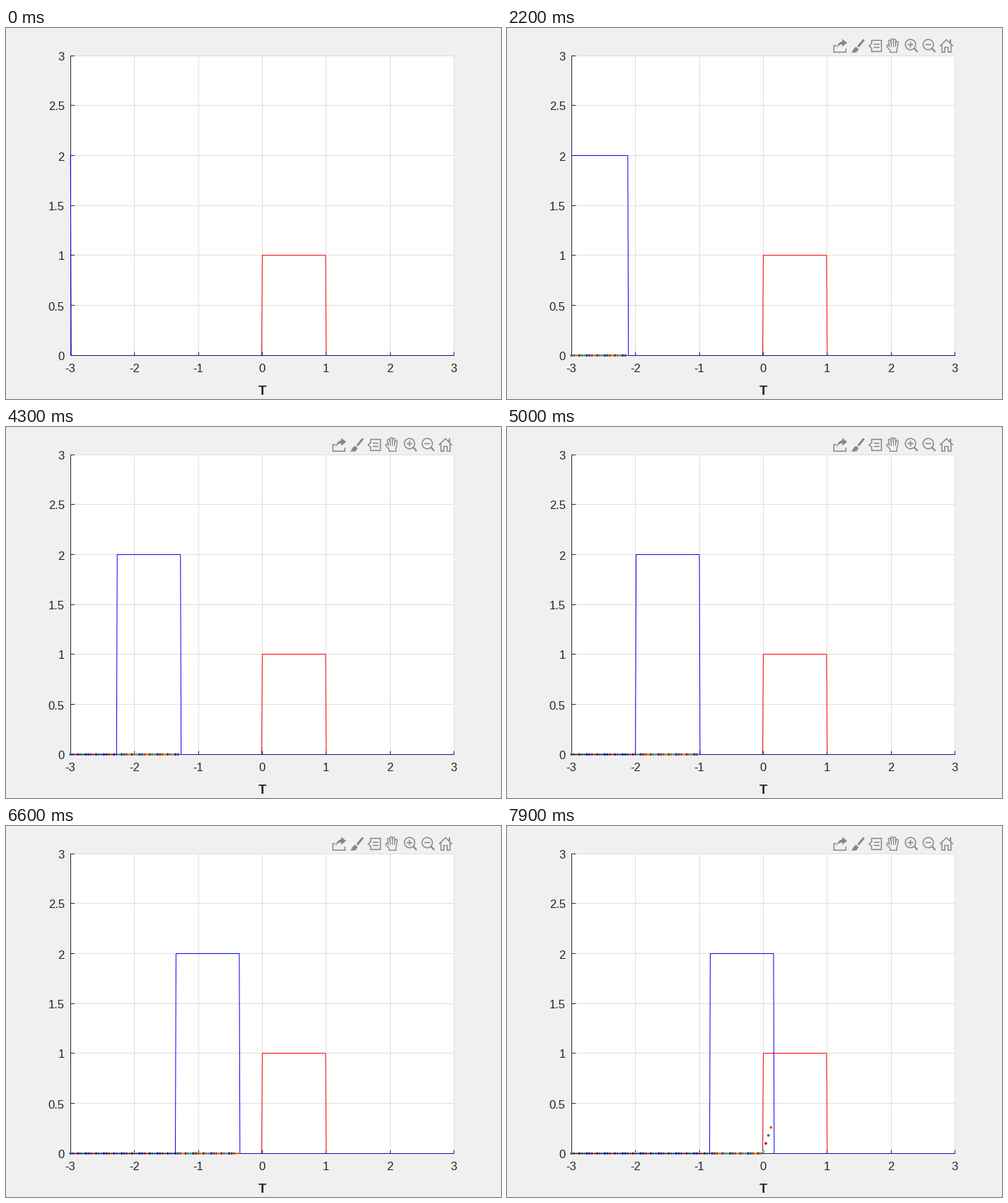
A matplotlib script for the animation above (8000 ms loop, 700 px wide and 525 px high).

```python
import numpy as np
import matplotlib.pyplot as plt
from matplotlib.animation import FuncAnimation
from matplotlib.patches import Circle, Polygon, Rectangle

W, H, DPI = 700, 525, 100
FRAMES, INTERVAL = 80, 100
PX = 72 / DPI
BACK, INK, ICON, GRID = "#F0F0F0", "#262626", "#868686", "#DFDFDF"
ORDER = ["#0072BD", "#D95319", "#EDB120", "#7E2F8E",
         "#77AC30", "#4DBEEE", "#A2142F"]

plt.rcParams["path.simplify"] = False
plt.rcParams["font.family"] = "Liberation Sans"

fig = plt.figure(figsize=(W / DPI, H / DPI), dpi=DPI, facecolor=BACK)
ax = fig.add_axes([0, 0, 1, 1])
ax.set_xlim(0, W)
ax.set_ylim(H, 0)
ax.axis("off")


def sx(v):
    return 91.25 + 90.4 * (np.asarray(v) + 3)


def sy(v):
    return 463.3 - 141.35 * np.asarray(v)


def pixel(p):
    """Centre of the pixel that holds p, for crisp lines."""
    return np.floor(p) + 0.5


def line(xs, ys, color, width=1, z=1, cap="butt", alpha=1):
    return ax.plot(xs, ys, color=color, lw=width * PX, zorder=z, snap=False,
                   solid_capstyle=cap, solid_joinstyle="miter",
                   alpha=alpha)[0]


def text(x, y, s, size=16.67, **kw):
    ax.text(x, y, s, fontsize=size * PX, color=INK, va="baseline", **kw)


# Axes box, grid, ticks and labels
left, right, top, base = pixel(sx(-3)), 634, 39, pixel(sy(0))
ax.add_patch(Rectangle((91, top), 543, 425, fc="white", lw=0, zorder=0))
for v in range(-3, 4):
    x = pixel(sx(v))
    line([x, x], [top, base], GRID)
    line([x, x], [base - 5, base], INK, z=1.5)
    text(sx(v) - 0.3, 487, str(v), ha="center")
for v in np.arange(0, 3.5, 0.5):
    y = pixel(sy(v))
    line([left, right], [y, y], GRID)
    line([left, left + 5.5], [y, y], INK, z=1.5)
    text(82.8, y + 7, f"{v:g}", ha="right")
line([left, left], [top, base], INK, z=1.6)
line([left, right], [base, base], INK, z=1.6)
line([left, right], [base, base], INK, z=4.5, alpha=0.4)
text(362.5, 519, "T", 18.33, ha="center", weight="bold")

# Pulses sampled every 0.01; n counts hundredths
n = np.arange(-300, 301)
red = ((n >= 0) & (n < 100)).astype(float)
line(sx(n / 100), pixel(sy(red)), "#FF0000", z=2)
blue = line([], [], "#0000FF", z=4)


def pulse(t):
    return 2.0 * ((n > t - 100) & (n <= t))


# Running product sum, one dot per step
steps = -300 + 4 * np.arange(FRAMES)
area = np.array([np.sum(red * pulse(t)) * 0.01 for t in steps])
points = np.column_stack([sx(steps / 100), sy(area)])
colors = [ORDER[i % len(ORDER)] for i in range(FRAMES)]
dots = ax.scatter([], [], s=(3.7 * PX) ** 2, linewidths=0, zorder=3,
                  clip_on=False)

# Toolbar icons, drawn around their centre (cx, CY)
CY = 25
tools = []


def stroke(cx, xs, ys, width=1.5, color=ICON, cap="butt"):
    tools.append(line(cx + np.array(xs), CY + np.array(ys), color, width,
                      5 + len(tools) / 100, cap))


def solid(cx, xs, ys):
    pts = np.column_stack([cx + np.array(xs), CY + np.array(ys)])
    tools.append(ax.add_patch(Polygon(pts, fc=ICON, lw=0, zorder=5)))


def export_icon(cx):
    stroke(cx, [-5, -8.7, -8.7, 8.3, 8.3], [0, 0, 9.2, 9.2, 4])
    solid(cx, [3, 10, 3], [-9.5, -4, 1.5])
    a = np.linspace(0, np.pi / 2, 12)
    xs, ys = -5 + 8.5 * (1 - np.cos(a)), -np.sin(a)
    solid(cx, [*xs, *xs[::-1]], [*(6 + 12 * ys), *(6 + 8 * ys[::-1])])


def brush_icon(cx):
    stroke(cx, [8.7, 0.5], [-8.5, 1.5], 3)
    solid(cx, [-9, -5.5, -2.5, 1.2, -2], [9.8, 4, 1.5, 5, 9.5])


def tip_icon(cx):
    stroke(cx, [-5.5, -5.5, 8.3, 8.3, -5.5, -5.5, -9, -5.5, -5.5],
           [-4, -7.5, -7.5, 8.3, 8.3, 3.5, 0.3, -3, -4])
    for y in (-2, 2.5):
        stroke(cx, [-2.5, 5.5], [y, y])


def hand_icon(cx):
    # A wide pass in grey, then a narrow one in the back colour
    for color, trim in ((ICON, 0), (BACK, 2.7)):
        for i in range(4):
            stroke(cx, [3.6 * i - 5.3, 2.4 * i - 3.2],
                   [1.3 * (i - 1.3) ** 2 - 8.4, 4], 4.5 - trim, color, "round")
        stroke(cx, [-7.8, -2], [0.5, 7], 4.5 - trim, color, "round")
        stroke(cx, [0.3, 0.3], [2, 10 - trim / 2], 11 - trim, color)


def zoom_icon(cx, plus):
    tools.append(ax.add_patch(Circle((cx - 0.7, CY - 1.5), 7.3, fc="none",
                                     ec=ICON, lw=1.5 * PX, zorder=5)))
    stroke(cx, [4.6, 9.3], [3.8, 9], 2.2)
    stroke(cx, [-4.7, 3.3], [-1.5, -1.5], 1.6)
    if plus:
        stroke(cx, [-0.7, -0.7], [-5.5, 2.5], 1.6)


def home_icon(cx):
    stroke(cx, [-9.3, 0, 9.3], [0.7, -8.5, 0.7])
    for side in (-1, 1):
        stroke(cx, side * np.array([6.4, 6.4, 2.4, 2.4, 0]),
               [-1.5, 9.2, 9.2, 2.5, 2.5])
    stroke(cx, [5.6, 5.6], [-3.5, -8.7], 2)


icons = [export_icon, brush_icon, tip_icon, hand_icon,
         lambda cx: zoom_icon(cx, True), lambda cx: zoom_icon(cx, False),
         home_icon]
for i, icon in enumerate(icons):
    icon(471 + 25.08 * i)


def update(k):
    blue.set_data(sx(n / 100), pixel(sy(pulse(steps[k]))))
    dots.set_offsets(points[:k] if k else np.empty((0, 2)))
    dots.set_facecolors(colors[:k] if k else "none")
    for tool in tools:
        tool.set_visible(k > 0)
    return [blue, dots, *tools]


anim = FuncAnimation(fig, update, frames=FRAMES, interval=INTERVAL,
                     repeat=True, repeat_delay=0, blit=False)
plt.show()
```
